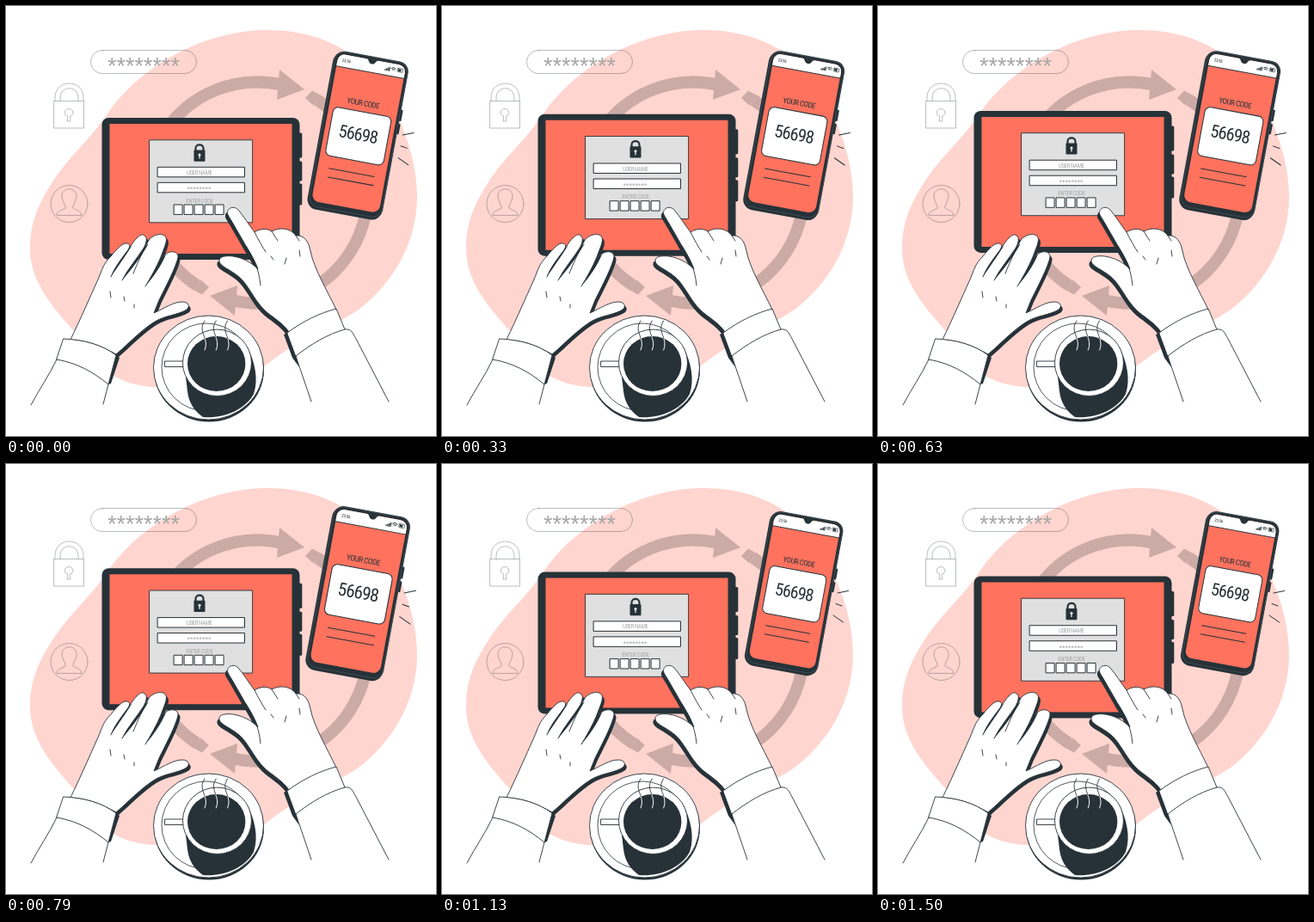
Recreate the animation shown at these times as an HTML page with a canvas. Size 500x500 px, loop 1.54 s.

```html
<!DOCTYPE html>
<html lang="en">
<head>
<meta charset="utf-8">
<title>Two factor code</title>
<style>
html, body { margin: 0; width: 100%; height: 100%; overflow: hidden; background: #fff; }
canvas { display: block; width: 500px; height: 500px; }
</style>
</head>
<body>
<canvas id="stage"></canvas>
<script>
const canvas = document.getElementById('stage');
const ctx = canvas.getContext('2d');
const ratio = window.devicePixelRatio || 1;
canvas.width = canvas.height = 500 * ratio;

const LOOP = 1540, STEPS = 37;
const DARK = '#263238', CORAL = '#ff725e', PINK = '#ffd5cf', ARROW = '#ccaaa6';
const PANEL = '#e0e0e0', GREY = '#a6a6a6', FAINT = 'rgba(38,50,56,.36)', WHITE = '#fff';
const CONDENSED = '"Roboto Condensed", "Open Sans Condensed", Roboto';

function paint(path, fill, stroke, width = 0.9) {
  if (fill) { ctx.fillStyle = fill; ctx.fill(path); }
  if (stroke) { ctx.strokeStyle = stroke; ctx.lineWidth = width; ctx.stroke(path); }
}

function shape(d, fill, stroke, width) {
  paint(new Path2D(d), fill, stroke, width);
}

function box(x, y, w, h, r, fill, stroke, width) {
  const path = new Path2D();
  path.roundRect(x, y, w, h, r);
  paint(path, fill, stroke, width);
}

function oval(x, y, rx, ry, fill, stroke, width) {
  const path = new Path2D();
  path.ellipse(x, y, rx, ry, 0, 0, 7);
  paint(path, fill, stroke, width);
}

function label(text, x, y, size, color, family = CONDENSED, tracking = -0.05) {
  ctx.font = `condensed ${size}px ${family}, sans-serif`;
  ctx.letterSpacing = `${size * tracking}px`;
  ctx.textAlign = 'center';
  ctx.fillStyle = color;
  ctx.fillText(text, x, y);
}

function stars(x, y, size, color) {
  label('********', x, y, size, color, '"Liberation Sans"', 0);
}

function group(draw, x = 0, y = 0, turn = 0, scale = 1) {
  ctx.save();
  ctx.translate(x, y);
  ctx.rotate(turn);
  ctx.scale(scale, scale);
  draw();
  ctx.restore();
}

// Half of the cycle, relative to its centre: arc, notched tail and arrowhead.
function halfCycle() {
  const arc = new Path2D();
  arc.arc(0, 0, 128.5, 123 * Math.PI / 180, 283 * Math.PI / 180);
  paint(arc, null, ARROW, 14);
  shape('M26 -143 L55 -120 L23 -108Z', ARROW);
  shape('M-52 125 L-64 118.5 L-56 110 L-65.5 101.5 L-73.8 113.3Z', ARROW);
}

function backdrop() {
  shape(`M298 28 C345 27 382 40 408 62 C446 96 479 164 478 224
    C477 277 449 323 410 353 C374 377 344 385 307 414
    C271 441 211 447 172 443 C135 441 105 425 86 386
    C62 358 28 326 28 282 C28 247 41 225 57 200
    C78 170 101 152 121 121 C155 74 222 31 298 28Z`, PINK);
  ctx.lineCap = 'butt';
  group(halfCycle, 292, 217);
  group(halfCycle, 292, 217, Math.PI);
  ctx.lineCap = 'round';
}

function icons() {
  box(98.5, 51.5, 123, 27, 13.5, null, FAINT);
  stars(160, 78.8, 27, GREY);
  box(56, 110.5, 34.5, 31.5, 0, null, FAINT);
  shape(`M57 110 V106.5 C57 84.5 90 84.5 90 106.5 V110
    M63 110 V107 C63 92 84 92 84 107 V110`, null, FAINT);
  shape('M71.5 128 C66 126 68 119.5 73 119.5 C78 119.5 80 126 74.7 128 V134 H71.5Z', null, FAINT);
  oval(73.5, 230, 21.5, 21.5, null, FAINT);
  shape(`M59 243 C59 238 65 238 69 235 C70 232 65 227 65 221
    C65 210 82 210 82 221 C82 227 77 232 78 235 C82 238 88 238 88 243Z`, null, FAINT);
}

function tablet() {
  for (const [y, h] of [[148, 29], [181, 23], [207, 25]]) box(336, y, 8.3, h, 1.5, DARK);
  box(111.5, 130.5, 230, 165, 8, DARK);
  box(120.5, 137.5, 212, 151, 0, CORAL);
  box(167, 156.3, 119.6, 96, 0, PANEL, DARK);
  shape('M220.5 169 V166 C220.5 160.5 229.5 160.5 229.5 166 V169', null, DARK, 2.2);
  box(218.5, 168, 13, 13.2, 0.8, DARK);
  oval(225, 173.5, 1.5, 1.5, WHITE);
  box(224.4, 174, 1.2, 4, 0, WHITE);
  box(176.5, 187.8, 101, 11.5, 0, WHITE, DARK, 1);
  box(176.5, 205.8, 101, 11.5, 0, WHITE, DARK, 1);
  label('USER NAME', 224.7, 196.4, 6.8, GREY);
  stars(224.5, 216.7, 9, GREY);
  label('ENTER CODE', 225, 229, 6.8, GREY);
  for (let i = 0; i < 5; i++) box(195.5 + i * 12, 231.5, 9.6, 11.4, 0, WHITE, DARK, 1);
}

function statusIcons() {
  label('23:56', -28.5, -78.5, 5, DARK);
  for (let i = 0; i < 4; i++) box(16 + i * 1.6, -79.4 - i, 1.2, 1.6 + i, 0, DARK);
  shape('M23.5 -81.5 Q26 -84 28.5 -81.5 M24.6 -80 Q26 -81.5 27.4 -80', null, DARK, 0.9);
  box(30.5, -82.8, 6, 4, 0.5, null, DARK, 0.6);
  box(31.2, -82.1, 3.4, 2.6, 0, DARK);
}

function phoneBody() {
  box(40, -37, 5, 13, 1, DARK);
  box(40, -21, 5, 12, 1, DARK);
  box(-43.5, -89.5, 86, 181.5, 12, DARK);
  box(-42.5, -90.7, 85.5, 180.5, 11.5, DARK);
  box(-41.7, -89.9, 83.9, 178.6, 10.7, null, '#5c696f', 0.4);
  box(-38.6, -87, 77.8, 170, 8, CORAL);
  box(-38.6, -87, 77.8, 14.5, [8, 8, 0, 0], WHITE);
  shape('M-38.6 -72.5 H39.2', null, DARK, 0.9);
  shape('M-7 -87.4 C-3 -87.4 -4 -82 0.5 -82 C5 -82 4 -87.4 8 -87.4Z', DARK);
  statusIcons();
  label('YOUR CODE', -1, -33.5, 8.8, DARK);
  box(-33, -26.8, 67, 56, 6, WHITE, DARK, 1);
  label('56698', -0.3, 6, 20, DARK);
  shape('M-25.5 43.2 H26.5 M-25 53.2 H27', null, DARK, 1);
}

function phone() {
  group(phoneBody, 0, 0, 10.5 * Math.PI / 180);
  shape('M50.5 0 L63 -2.5 M48.5 12.5 L55.5 15 M45.5 26 L57 34', null, DARK, 1);
}

function shaded(d, dx, dy) {
  group(() => shape(d, DARK), dx, dy);
  shape(d, WHITE, DARK);
}

function leftArm() {
  shaded(`M75 388 C88 361 97 340 107 318 C112 306 113 300 122 291
    C130 281 136 275 141 276 C144 277 144 279 143 282
    C150 271 157 263 161 267 C165 269 163 275 161 280
    L166 272 C173 264 184 264 186 269 C188 274 183 283 180 292
    L185 289 C192 283 201 286 200 292 C198 303 186 326 178 342
    L172 357 C185 351 195 344 205 344 C213 344 214 350 210 353
    C201 359 184 360 173 367 C157 377 142 393 128 405 C110 395 95 389 75 388Z`, 2.5, 3.5);
  shape(`M143 282 C136 292 127 302 122 315 C130 303 138 292 147 278Z
    M161 280 C153 293 142 305 135 319 C146 306 155 295 166 276Z
    M180 292 C175 304 168 316 162 326 C172 314 180 303 186 289Z`, DARK);
  shape(`M143 282 C136 292 127 302 122 315 M161 280 C153 293 142 305 135 319
    M166 272 C160 284 153 298 148 311 M180 292 C175 304 168 316 162 326
    M121 332 L122 339 M137 338 L138 343 M149 347 L149 351`, null, DARK);
  shape('M59 411 L29 464 H113 L119 440Z', WHITE);
  shape('M128 406 L132 409 L122 439 L119 440Z', DARK);
  shape('M67 387 C91 388 112 394 128 406 L119 440 C101 425 82 415 59 411Z', WHITE, DARK);
  shape('M59 411 C50 430 39 445 29 464 M119 440 L113 463', null, DARK);
}

function rightArm() {
  shaded(`M258 243 C255 236 264 231 270 237 C277 245 282 254 289 263
    C295 259 303 258 309 262 C318 257 331 258 337 267
    C347 266 352 274 354 285 C358 305 373 330 384 353 L329 379
    C322 368 308 361 300 353 C288 341 281 323 271 315
    C262 307 249 303 248 297 C247 291 256 290 264 291
    C276 293 285 298 293 306 C289 295 284 287 279 279
    C272 267 265 254 258 243Z`, -2.5, 4);
  shape(`M279 279 C285 290 294 302 296 325 M289 263 C293 271 298 280 302 286
    M309 262 L316 273 M337 267 L341 273
    M308 291 L311 295 M326 293 L324 300 M341 284 L342 291`, null, DARK);
  shape('M337 407 C359 392 376 381 394 376 L402 378 L445 460 H355Z', WHITE);
  shape('M327 380 L323 382 L333 409 L341 420 L337 407Z', DARK);
  shape('M327 380 C346 366 365 357 384 352 L394 376 C373 382 355 393 337 407Z', WHITE, DARK);
  shape('M337 407 L355 460 M394 376 C402 375 403 380 407 387 L445 460', null, DARK);
}

function coffee() {
  oval(236, 423, 64, 60.5, DARK);
  oval(235.5, 420.5, 64, 60.5, WHITE, DARK);
  oval(233, 420, 52, 51, null, DARK, 0.8);
  shape(`M209 432 C212 449 209 463 229 478 C252 480 278 470 288 451
    C294 433 289 414 281 397Z`, DARK);
  box(185, 413, 24, 6.5, 0, WHITE, DARK);
  oval(245.5, 414.8, 40, 38.7, WHITE, DARK);
  const surface = new Path2D();
  surface.ellipse(244.7, 416, 33.7, 32, 0, 0, 7);
  paint(surface, DARK);
  const steam = new Path2D();
  for (let i = 0; i < 3; i++) {
    steam.moveTo(231 + i * 13.3, 366);
    steam.bezierCurveTo(222 + i * 13.3, 379, 237 + i * 13.3, 386, 231 + i * 13.3, 400);
  }
  paint(steam, null, DARK);
  ctx.save();
  ctx.clip(surface);
  paint(steam, null, WHITE, 1);
  ctx.restore();
}

// Two linear pulses to 110 %, followed by a rest.
function pulse(p) {
  const first = p < 0.1 ? p / 0.1 : (0.3 - p) / 0.2;
  const second = 1 - Math.abs(p - 0.5) / 0.1;
  return 1 + 0.1 * Math.max(0, first, second);
}

function render(now) {
  const step = Math.floor(((now + 4) % LOOP) / LOOP * STEPS);
  const phase = (step + 0.9) / STEPS;
  const lift = 10 * (1 - Math.abs(1 - 2 * phase));
  ctx.setTransform(ratio, 0, 0, ratio, 0, 0);
  ctx.fillStyle = WHITE;
  ctx.fillRect(0, 0, 500, 500);
  ctx.lineJoin = 'round';
  backdrop();
  icons();
  group(tablet, 0, -lift);
  group(phone, 409.5, 150, 0, pulse(phase));
  leftArm();
  rightArm();
  coffee();
}

let start;
function tick(now) {
  start ??= now;
  render(now - start);
  requestAnimationFrame(tick);
}
requestAnimationFrame(tick);
</script>
</body>
</html>
```
